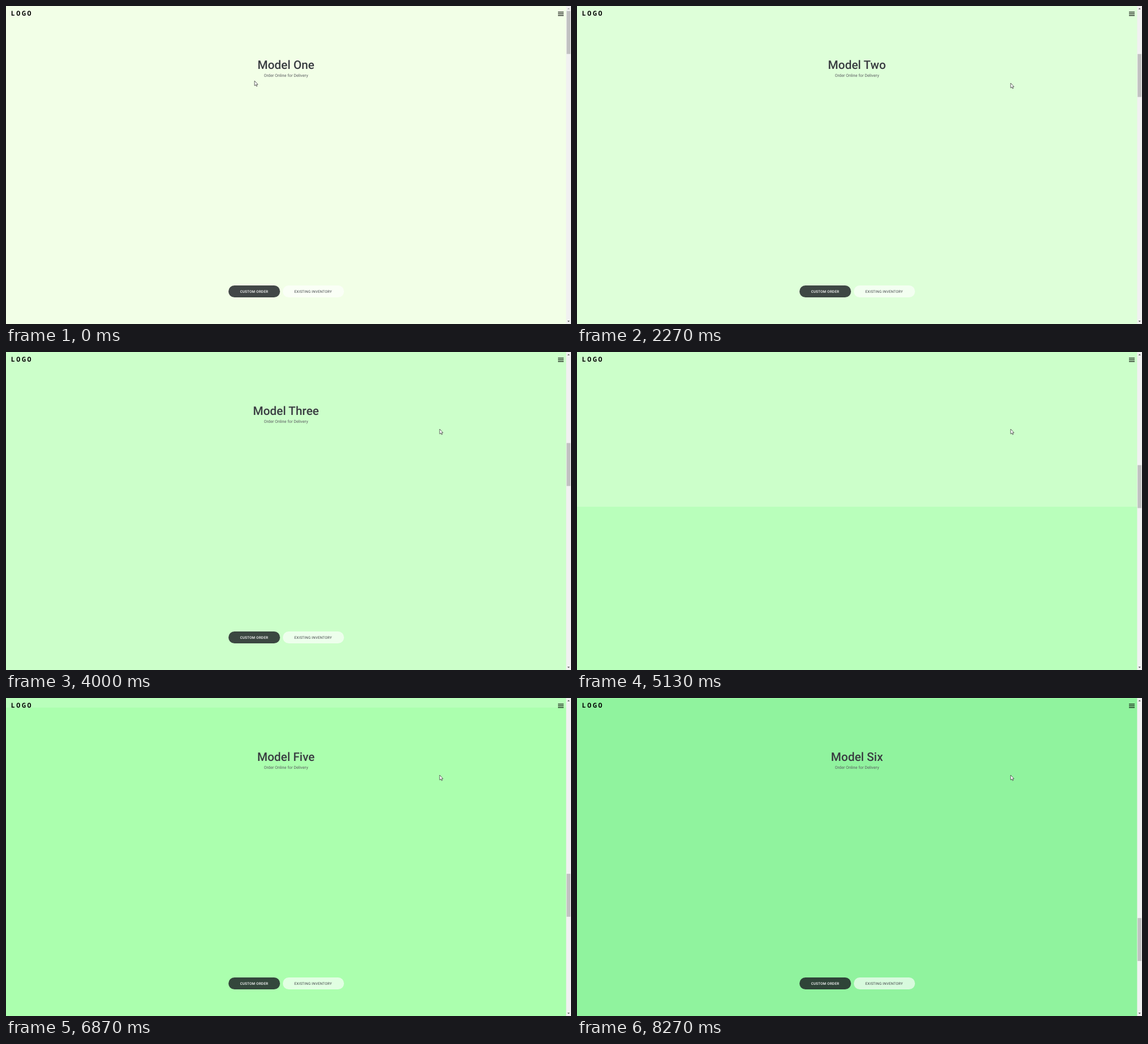
Write an HTML page with a canvas that moves like this. It is 998 px wide and 561 px high and loops after 9940 ms.

```html
<!DOCTYPE html>
<html lang="en">
<head>
<meta charset="utf-8">
<title>Model showcase</title>
<style>
  html, body { margin: 0; width: 100%; height: 100%; overflow: hidden; }
  body { position: relative; font-family: Roboto, sans-serif; text-rendering: geometricPrecision; }
  canvas, .page, #logo, #cursor { position: absolute; left: 0; top: 0; }
  canvas { display: block; }
  .page { width: 989px; height: 561px; text-align: center; opacity: 0; }
  .page > * { position: absolute; margin: 0; white-space: nowrap; }
  .page h1 { top: 93px; width: 100%; font-size: 20.8px; line-height: 24px; font-weight: 500; color: #393c41; }
  .page p { top: 118px; width: 100%; font-size: 7.28px; line-height: 9px; color: #5c5e62; }
  .btn { top: 493px; height: 21px; border-radius: 10.5px; font-size: 6.24px; line-height: 22px; letter-spacing: .26px; }
  .dark { left: 393px; width: 90.5px; background: rgba(23, 26, 32, .8); color: #fff; font-weight: 500; }
  .light { left: 488.5px; width: 108px; background: rgba(255, 255, 255, .65); color: #393c41; }
  #logo { left: 8.7px; top: 5px; font: 700 11.7px/16px "Noto Sans Mono", monospace; letter-spacing: 2.6px; color: #000; }
</style>
</head>
<body>
<canvas id="stage" width="998" height="561"></canvas>
<div id="logo">LOGO</div>
<svg id="cursor" width="10" height="14" viewBox="-1 -1 10 14">
  <path d="M0 0V8.6L2 6.9L3.4 9.8L4.7 9.2L3.4 6.4H5.9Z" fill="#fff" stroke="#222" stroke-width=".7"/>
</svg>
<script>
const LOOP = 9940, STEP = 1000 / 15, W = 989, H = 561, TICK = 52;
const colors = ['#f2ffe7', '#deffd9', '#ccffca', '#b9ffbb', '#abffae', '#90f39e', '#90f39e'];
const names = ['One', 'Two', 'Three', 'Four', 'Five', 'Six'];

// Resting scroll position of a page; the later ones stop just short.
const rest = i => i * H - (i > 2 ? 0.6 : 0);
const nudge = i => i * H + TICK;

// Scroll moves: start, end, from, to
const moves = [
  [610, 930, 0, nudge(0)],
  [1265, 1800, nudge(0), H - 26],
  [2135, 2266, H - 26, rest(1)],
  [2950, 3130, rest(1), nudge(1)],
  [3447, 3987, nudge(1), rest(2)],
  [4345, 4600, rest(2), nudge(2)],
  [4865, 5425, nudge(2), rest(3)],
  [5950, 6130, rest(3), nudge(3)],
  [6417, 6932, nudge(3), rest(4)],
  [7205, 7600, rest(4), nudge(4)],
  [7733, 8263, nudge(4), rest(5)]
];

const clamp = v => Math.max(0, Math.min(1, v));
const ctx = document.getElementById('stage').getContext('2d');
const cursor = document.getElementById('cursor');

const pages = names.map(name => {
  const page = document.createElement('div');
  page.className = 'page';
  page.innerHTML = `<h1>Model ${name}</h1><p>Order Online for Delivery</p>
    <div class="btn dark">CUSTOM ORDER</div><div class="btn light">EXISTING INVENTORY</div>`;
  document.body.insertBefore(page, cursor);
  return page;
});

// cubic-bezier(.42, 0, .58, 1)
function ease(x) {
  x = clamp(x);
  if (x === 0 || x === 1) return x;
  let lo = 0, hi = 1, s = 0.5;
  for (let i = 0; i < 24; i++) {
    s = (lo + hi) / 2;
    const u = 1 - s;
    if (1.26 * s * u * u + 1.74 * s * s * u + s * s * s < x) lo = s; else hi = s;
  }
  return s * s * (3 - 2 * s);
}

function scrollAt(t) {
  let y = 0;
  for (const [start, end, from, to] of moves) {
    if (t < start) break;
    y = from + (to - from) * ease((t - start) / (end - start));
  }
  return y;
}

function rect(x, y, w, h, color) {
  ctx.fillStyle = color;
  ctx.fillRect(x, y, w, h);
}

function arrow(y, dir, color) {
  ctx.fillStyle = color;
  ctx.beginPath();
  ctx.moveTo(993.7, y - 1.1 * dir);
  ctx.lineTo(995.8, y + 1.1 * dir);
  ctx.lineTo(991.6, y + 1.1 * dir);
  ctx.fill();
}

function drawStage(y) {
  const i = Math.floor(y / H);
  const edge = (i + 1) * H - y;
  rect(0, 0, W + 1, H, colors[i]);
  rect(0, edge, W + 1, H - edge, colors[i + 1]);

  for (let k = 0; k < 3; k++) rect(975, 10.2 + 3 * k, 10, 1.2, '#000');

  rect(W + 0.4, 0, 9, H, '#f1f1f1');
  rect(990.3, 8.8 + y / H * 75.9, 6.7, 75.8, '#c1c1c1');
  arrow(4.7, 1, y > 0 ? '#505050' : '#a3a3a3');
  arrow(556.3, -1, '#505050');
}

function fadePages(y) {
  pages.forEach((page, i) => {
    const off = Math.abs(y / H - i);
    page.style.opacity = clamp((0.42 - off) / 0.37);
  });
}

function moveCursor(t) {
  const p = ease(t / 533);
  const x = 439 + 327 * p;
  const y = 132 + 4 * p - 16 * Math.sin(Math.PI * p);
  cursor.style.transform = `translate(${x - 1}px, ${y - 1}px)`;
}

function render(now) {
  const t = Math.floor(((now % LOOP) + 4) / STEP) * STEP;
  const y = scrollAt(t);
  drawStage(y);
  fadePages(y);
  moveCursor(t);
}

let begin = null;
function frame(now) {
  if (begin === null) begin = now;
  render(now - begin);
  requestAnimationFrame(frame);
}
render(0);
requestAnimationFrame(frame);
</script>
</body>
</html>
```
